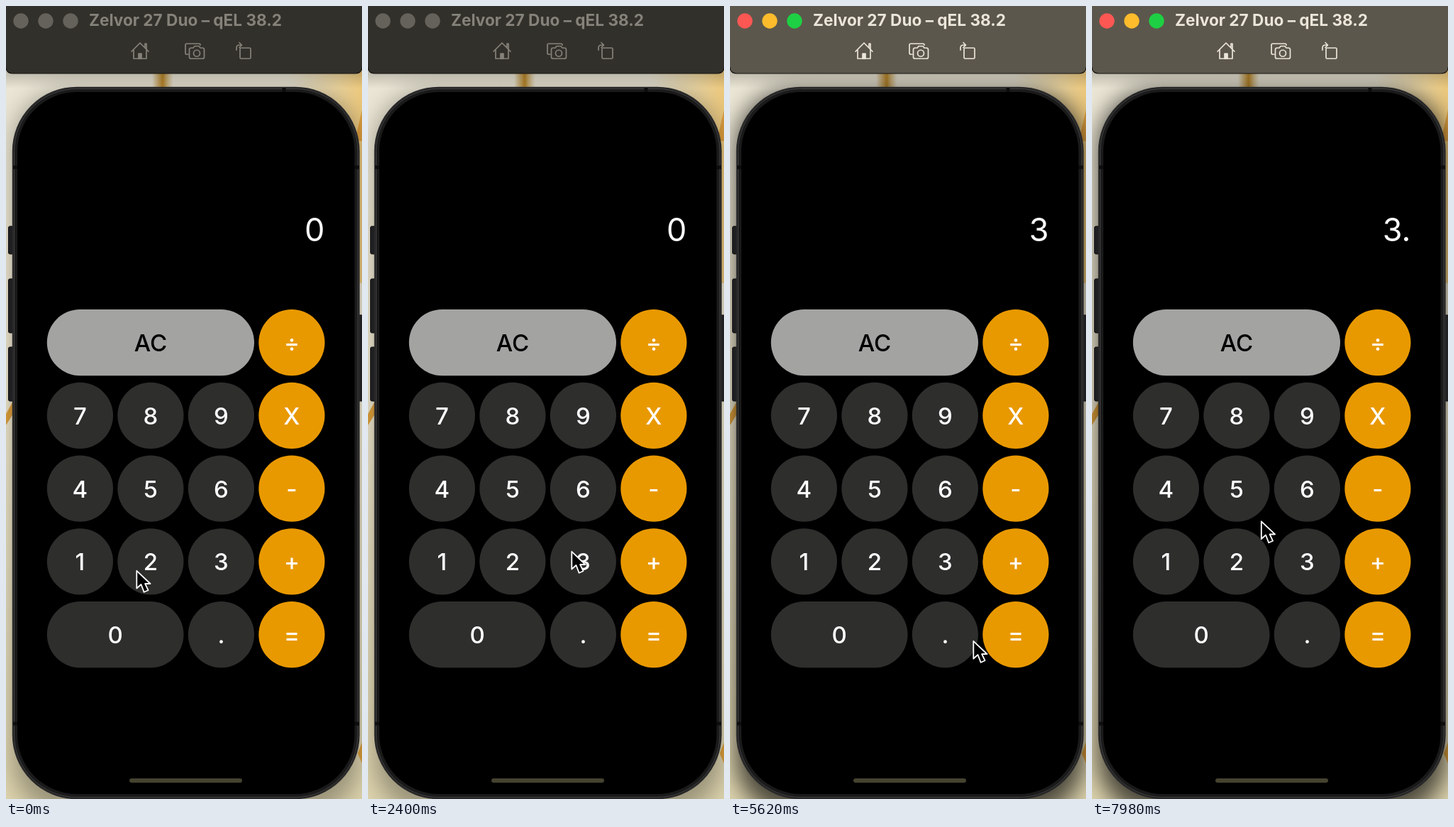
An HTML page that plays this animation: 502 px wide and 1116 px high, repeating every 8000 ms.

```html
<!DOCTYPE html>
<html lang="en">
<head>
<meta charset="utf-8">
<title>Calculator</title>
<style>
  html, body { margin: 0; width: 100%; height: 100%; overflow: hidden; background: #000; }
  svg { display: block; width: 502px; height: 1116px; font-family: Inter, Roboto, sans-serif; }
  .key { font-size: 33px; font-weight: 500; text-anchor: middle; }
  #window { --ink: #85827a; --bar: #32302a; }
  #window.active { --ink: #ebe6d9; --bar: #5c574c; }
  #shadow { opacity: .3; }
  .active #shadow { opacity: .66; }
  .icon { fill: none; stroke: var(--ink); stroke-width: 1.7; stroke-linejoin: round; stroke-linecap: round; }
</style>
</head>
<body>
<svg viewBox="0 0 502 1116">
  <defs>
    <linearGradient id="wall" x2="0" y2="1">
      <stop offset="0" stop-color="#e9e5d6"/>
      <stop offset=".5" stop-color="#efe7cd"/>
      <stop offset="1" stop-color="#ddd3ad"/>
    </linearGradient>
    <linearGradient id="barShade" x2="0" y2="1">
      <stop offset="0" stop-opacity=".2"/>
      <stop offset="1" stop-opacity="0"/>
    </linearGradient>
    <linearGradient id="stripe">
      <stop offset="0" stop-color="#b98525" stop-opacity="0"/>
      <stop offset=".5" stop-color="#b98525"/>
      <stop offset="1" stop-color="#c9a860" stop-opacity="0"/>
    </linearGradient>
    <linearGradient id="glow">
      <stop offset="0" stop-color="#ecd08a" stop-opacity="0"/>
      <stop offset="1" stop-color="#ecc87c"/>
    </linearGradient>
    <filter id="blur" x="-20%" y="-20%" width="140%" height="140%">
      <feGaussianBlur stdDeviation="16"/>
    </filter>
  </defs>

  <g id="window">
    <rect width="502" height="1116" fill="url(#wall)"/>
    <rect x="206" y="90" width="30" height="30" fill="url(#stripe)"/>
    <rect x="400" y="90" width="102" height="300" fill="url(#glow)"/>
    <path d="M502 146L492 190H502Z" fill="#e0a040"/>
    <path d="M0 574L10 556V574L0 590Z" fill="#dfa13c"/>
    <path d="M502 1036L496 1052L502 1066Z" fill="#dfa13c"/>
    <rect y="92" width="502" height="24" fill="url(#barShade)"/>
    <rect id="shadow" x="8" y="118" width="492" height="1020" rx="80" filter="url(#blur)"/>

    <path d="M0 0H502V86Q502 95 492 95H10Q0 95 0 86Z" fill="var(--bar)"/>
    <path d="M0 86Q0 95 10 95H492Q502 95 502 86" fill="none" stroke="#171512" stroke-width="1.2"/>
    <g id="lights"></g>
    <text x="117" y="28" font-size="22.6" font-weight="700" fill="var(--ink)">Zelvor 27 Duo – qEL 38.2</text>
    <g class="icon">
      <path d="M177 64L189 52L201 64M180 62V74H198V62M196 58V53H198V61"/>
      <path d="M187 74V67H191V74Z" fill="var(--ink)"/>
      <path d="M257 68H255Q253 68 253 66V55Q253 53 255 53H272Q274 53 274 55"/>
      <path d="M261 59H264L266 56.500H272L274 59H277Q279.500 59 279.500 61.500V72Q279.500 74 277 74H261Q258.500 74 258.500 72V61.500Q258.500 59 261 59Z"/>
      <circle cx="269" cy="66.500" r="4.500"/>
      <rect x="330" y="59" width="15" height="15" rx="1.500"/>
      <path d="M325 62V59Q325 55 329 55H332M329 51.500L332.500 55L329 58.500"/>
    </g>
  </g>

  <g fill="#202023" stroke="#0c0c0e">
    <rect x="3.500" y="310" width="10" height="39" rx="2"/>
    <rect x="3.500" y="384" width="10" height="76" rx="2"/>
    <rect x="3.500" y="480" width="10" height="76" rx="2"/>
    <rect x="490" y="435" width="14" height="121" rx="2"/>
  </g>
  <rect x="9.500" y="114.500" width="488.500" height="1001" rx="90" fill="#1a1a1a" stroke="#2c2c2d" stroke-width="1.500"/>
  <rect x="11.500" y="116.500" width="484.500" height="997" rx="88" fill="none" stroke="#434344"/>
  <path d="M10 227H17M491 227H498M10 1010H17M491 1010H498M392 115V121" stroke="#0d0d0e" stroke-width="5"/>
  <rect x="16" y="121" width="475.500" height="988" rx="84"/>
  <rect x="174" y="1087" width="159" height="6" rx="3" fill="#45432f"/>
  <text id="display" x="449.500" y="331" font-size="45" text-anchor="end" fill="#fff">0</text>
  <g id="keys"></g>
  <path id="cursor" d="M.8 1.800V26.500L7 21L11.200 31.800L17 29.200L12.600 20H20Z" fill="#000" stroke="#fff" stroke-width="1.800" stroke-linejoin="round"/>
</svg>
<script>
const LOOP = 8000;
const $ = id => document.getElementById(id);

function add(parent, tag, attrs, text = '') {
  const node = document.createElementNS('http://www.w3.org/2000/svg', tag);
  for (const name in attrs) node.setAttribute(name, attrs[name]);
  node.textContent = text;
  parent.append(node);
  return node;
}

// Keypad rows; a label may span several columns.
const rows = [
  [['AC', 3], ['÷', 1]],
  [['7', 1], ['8', 1], ['9', 1], ['X', 1]],
  [['4', 1], ['5', 1], ['6', 1], ['-', 1]],
  [['1', 1], ['2', 1], ['3', 1], ['+', 1]],
  [['0', 2], ['.', 1], ['=', 1]]
];
const keys = {};
rows.forEach((row, r) => {
  let col = 0;
  for (const [label, span] of row) {
    const x = 57.8 + col * 99.5, y = 427 + r * 102.75, width = 93.2 + (span - 1) * 99.5;
    const fill = label === 'AC' ? '#a3a3a2' : col === 3 ? '#e99900' : '#2e2e2d';
    const group = keys[label] = add($('keys'), 'g', {});
    add(group, 'rect', { x, y, width, height: 93.2, rx: 46.6, fill });
    add(group, 'text', {
      class: 'key', x: x + width / 2, y: y + 59, fill: label === 'AC' ? '#000' : '#fff'
    }, label);
    col += span;
  }
});

const lightColors = ['#fc5753', '#fdbc2c', '#1ed043'];
const lights = lightColors.map((_, i) => add($('lights'), 'circle', { cx: 21 + 35 * i, cy: 21, r: 10.7 }));

// Pointer path: time, x, y
const path = [
  [0, 183.5, 793], [660, 183.5, 793], [1140, 270, 757], [1640, 270, 757],
  [1660, 271, 758], [2400, 286.5, 766], [5160, 286.5, 766], [5620, 342.5, 892],
  [5900, 346, 895], [6000, 346, 895], [6460, 320, 883], [6600, 317, 885],
  [7680, 317, 885], [7980, 238, 723.5], [LOOP, 238, 723.5]
];

function pointerAt(t) {
  const i = path.findIndex(p => p[0] > t);
  const [t0, x0, y0] = path[i - 1], [t1, x1, y1] = path[i];
  const u = (t - t0) / (t1 - t0), e = u * u * (3 - 2 * u);
  return [x0 + (x1 - x0) * e, y0 + (y1 - y0) * e];
}

const presses = { '3': 2520, '.': 7140 };

function draw(t) {
  const active = t >= 2520;
  $('window').classList.toggle('active', active);
  lights.forEach((light, i) => light.setAttribute('fill', active ? lightColors[i] : '#65625b'));
  $('display').textContent = t < 2600 ? '0' : t < 7200 ? '3' : '3.';
  for (const label in presses) {
    const age = t - presses[label];
    keys[label].setAttribute('opacity', age >= 0 && age < 110 ? 0.75 : 1);
  }
  $('cursor').setAttribute('transform', `translate(${pointerAt(t)})`);
}

const start = performance.now();
function tick() {
  draw((performance.now() - start) % LOOP);
  requestAnimationFrame(tick);
}
tick();
</script>
</body>
</html>
```
